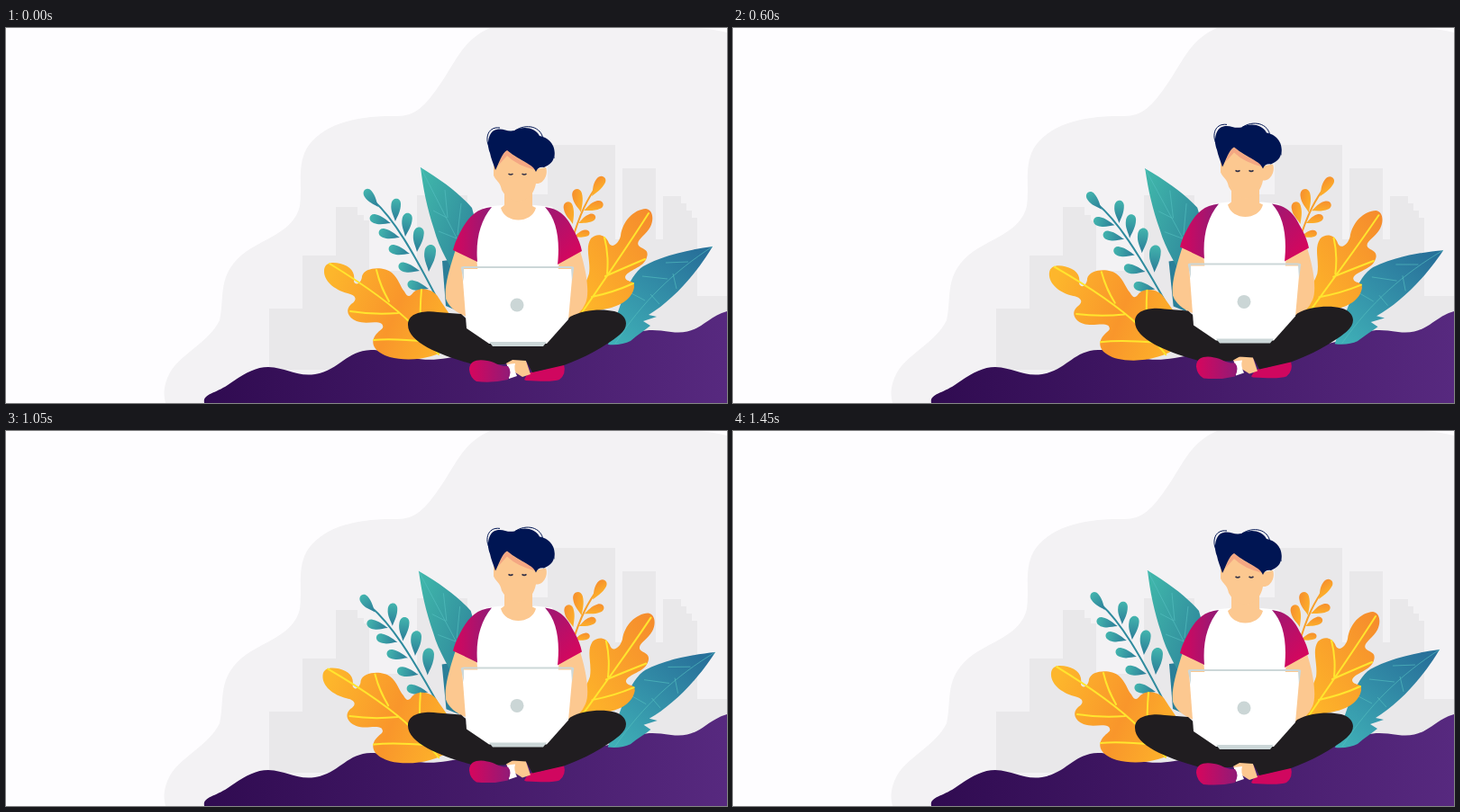
These frames come from a looping animation (800x417 px, 1.5 s). An HTML page:

```html
<!DOCTYPE html>
<html lang="en">
<head>
<meta charset="utf-8">
<title>Working outdoors</title>
<style>
  html, body { margin: 0; width: 100%; height: 100%; overflow: hidden; background: #fefdff; }
  svg { display: block; width: 100vw; height: 100vh; }
  .vein { fill: none; stroke: #ffe52e; stroke-width: 2; stroke-linecap: round; }
  .rib { fill: none; stroke: #55bfc0; stroke-width: .8; opacity: .8; }
  .stem { fill: none; stroke-width: 2; }
</style>
</head>
<body>
<svg viewBox="0 0 800 417" preserveAspectRatio="none">
  <defs>
    <linearGradient id="hill"><stop stop-color="#300b51"/><stop offset="1" stop-color="#57297f"/></linearGradient>
    <linearGradient id="gold" x1="0" y1=".3" x2="1" y2=".6"><stop stop-color="#fdb62c"/><stop offset=".55" stop-color="#f9962b"/><stop offset="1" stop-color="#fdb32a"/></linearGradient>
    <linearGradient id="amber" x1="1" y1="0" x2="0" y2="1"><stop stop-color="#f58a2d"/><stop offset="1" stop-color="#ffba29"/></linearGradient>
    <linearGradient id="teal" x1="0" y1="0" x2="1" y2=".6"><stop stop-color="#41b9ab"/><stop offset="1" stop-color="#2c7e99"/></linearGradient>
    <linearGradient id="sea" x1="0" y1="1" x2=".8" y2="0"><stop stop-color="#40b2b8"/><stop offset="1" stop-color="#28719a"/></linearGradient>
    <linearGradient id="sprig"><stop stop-color="#2b7b97"/><stop offset="1" stop-color="#43b5ae"/></linearGradient>
    <linearGradient id="sleeve"><stop stop-color="#d6065d"/><stop offset="1" stop-color="#901b77"/></linearGradient>
    <linearGradient id="sleeveR" x1="0" y1="0" x2=".6" y2="1"><stop stop-color="#9c1873"/><stop offset="1" stop-color="#d6065d"/></linearGradient>
    <path id="leaf" d="M0 0C6-2 10-6 18-5.500C26-5 26 4 19 4.500C11 5 6 2 0 0Z"/>
  </defs>

  <path fill="#f3f2f4" d="M800 5Q785 1 765 0H537C507 13 500 36 482 62C465 87 454 98 434 98C390 97 350 106 333 135C323 155 329 175 326 198C319 228 284 234 262 252C234 276 243 299 237 325C225 350 191 364 181 385C174 399 175 409 177 417H800Z"/>
  <path fill="#e9e8ea" d="M292 380V312H329V253H366V199H390V208H397V214H403V270H456V186H512V230H565V185H601V130H676V235H684V156H721V235H729V187H749V195H755V203H761V211H767V298H800V380Z"/>
  <path fill="url(#hill)" d="M220 417C218 407 231 407 246 397C262 386 275 377 291 377C312 378 322 388 343 385C371 380 377 359 405 358C430 358 450 374 490 367C560 354 630 364 685 344C708 334 717 335 738 338C770 342 775 322 800 315V417Z"/>

  <g id="spike">
    <path fill="#2b7f98" d="M484 259L500 257L502 315L488 309Z"/>
    <path fill="url(#teal)" d="M460 155C485 170 505 186 517 200L540 285H505C491 263 480 243 475 224C467 199 463 180 460 155Z"/>
    <path class="rib" d="M460 155Q488 210 516 265M474 203L489 211M487 180L490 211M480 226L500 234M505 195L501 230"/>
  </g>
  <g id="fern"><path class="stem" stroke="#2f8b9e" d="M408 192C430 212 450 245 484 312"/></g>
  <g id="oak">
    <path fill="url(#gold)" d="M353 269C354 260 363 260 371 262C382 265 388 271 386 282C389 288 395 282 395 276C398 265 420 265 428 272C436 279 437 287 442 293C446 301 449 298 452 294C459 287 475 290 480 300C488 313 510 338 495 354C475 369 445 371 426 366C410 361 404 352 409 343C415 334 421 335 417 329C410 325 400 330 389 326C379 322 376 313 383 307C391 302 388 297 379 295C364 291 352 281 353 269Z"/>
    <path class="vein" d="M359 262C390 281 425 304 451 330Q462 340 480 363M411 269C415 286 420 295 425 304M382 315Q407 319 435 317M461 291Q459 312 460 338M408 347Q430 345 468 349"/>
  </g>
  <g id="twig"><path class="stem" stroke="#f8a02b" d="M658 172C645 190 637 205 627 240"/></g>
  <g id="blade">
    <path fill="url(#sea)" d="M784 243C760 246 728 253 707 265C690 276 680 312 668 352C678 353 687 351 693 348C701 341 709 336 715 331L707 326L722 321L713 319C738 304 765 275 784 243Z"/>
    <path class="rib" d="M784 243C742 270 705 305 676 351M757 260L732 261M734 279L706 276M709 303L692 294M740 273L744 290M715 296L725 307"/>
  </g>
  <g id="maple">
    <path fill="url(#amber)" d="M710 201C718 202 719 213 715 221C710 231 698 236 702 242C706 246 714 246 711 255C708 267 689 269 687 277C688 284 698 279 697 288C695 301 682 309 667 312C651 316 640 317 632 322C633 295 643 287 647 273C649 258 642 245 649 234C655 228 664 229 668 237C671 247 680 240 682 231C684 215 696 202 710 201Z"/>
    <path class="vein" d="M713 206C696 233 675 264 640 315M664 233Q669 252 667 273M709 257Q690 265 665 276M696 284Q674 294 650 299"/>
  </g>

  <g id="person">
    <path fill="#fcc890" d="M499 246C493 265 486 286 488 301Q493 315 514 322L530 255ZM637 248C644 270 648 295 643 306Q638 319 620 328L608 258Z"/>
    <path fill="#fff" d="M530 199L551 197Q568 205 586 197L606 199L617 230L612 275H524L520 235Z"/>
    <path fill="url(#sleeve)" d="M539 199C519 201 511 214 504 227Q498 238 496 247L523 260C521 235 526 215 539 199Z"/>
    <path fill="url(#sleeveR)" d="M598 199C619 202 624 214 631 227Q637 238 639 248L612 263C615 235 611 213 598 199Z"/>
    <path fill="#fcc890" d="M553 178H584V198L588 200C583 218 554 218 549 200L553 197Z"/>
    <path fill="#fcc890" d="M541 147V164C544 171 548 170 550 180C554 188 562 193 569 193C581 191 586 183 588 173C597 174 602 162 599 155L588 157L575 134H552Z"/>
    <path fill="#f4a783" d="M546 153Q551 139 556 136Q570 149 587 153L588 158Q567 153 556 142Z"/>
    <path fill="#001553" d="M543 158C541 151 538 145 537 139C533 129 535 115 544 113C552 111 556 116 564 114C573 109 587 110 592 120C604 122 611 133 608 143C607 151 600 153 597 155Q590 154 588 160C585 151 572 149 556 136C550 139 547 151 543 158Z"/>
    <path fill="none" stroke="#001553" d="M539 137C530 126 533 109 548 111M565 114C577 106 594 109 596 124M602 127Q609 133 608 145"/>
    <path fill="none" stroke="#303047" stroke-width="1.500" d="M557.500 162Q560 164 562.500 162M572.500 162Q575 164 577.500 162"/>

    <path fill="#d0075f" d="M575 391Q579 381 592 381L619 374Q622 385 614 391Q607 394 577 392Z"/>
    <path fill="#fcc890" d="M554 370L576 367L582 385L573 388L557 378Z"/>
    <path fill="#201d20" d="M446 330C446 316 465 314 479 316L505 318L540 350H598L626 321C641 313 661 312 675 315C690 319 692 332 681 341C664 355 641 367 619 375L584 383L577 370L562 369L553 374L518 374C490 366 446 352 446 330Z"/>
    <path fill="#fff" d="M556 374L565 373Q563 379 567 387L558 390Z"/>
    <path fill="url(#sleeve)" d="M514 380C514 369 525 368 534 370C542 371 548 377 557 376Q562 382 557 391Q540 395 522 393Q515 389 514 380Z"/>
    <path fill="#fff" d="M506 268H629L624 324L600 351H536L511 334Z"/>
    <path fill="#ccd7d8" d="M505 268Q504 265 508 265H627Q631 265 630 268L628 282L627 267H508V282ZM536 349H600L596 354H540Z"/>
    <circle cx="567" cy="308" r="7.500" fill="#cbd6d6"/>
  </g>
</svg>
<script>
const byId = id => document.getElementById(id);

// Each leaf: base x, base y, direction in degrees, size.
function addLeaves(id, fill, leaves) {
  byId(id).insertAdjacentHTML('beforeend', leaves.map(([x, y, angle, size]) =>
    `<use href="#leaf" fill="${fill}" transform="translate(${x} ${y}) rotate(${angle}) scale(${size})"/>`).join(''));
}
addLeaves('fern', 'url(#sprig)', [
  [413, 199, 234, 1], [427, 217, 197, 1], [437, 233, 197, 1], [448, 251, 197, 1],
  [459, 270, 195, 1], [469, 290, 195, 1], [476, 302, 170, .95],
  [432, 215, -86, 1.050], [443, 232, -82, 1.100], [456, 249, -83, 1.150], [469, 271, -84, 1.250]
]);
addLeaves('twig', 'url(#amber)', [
  [650, 187, -58, 1.050], [641, 203, -20, .95], [635, 217, -22, .85], [630, 232, -15, .75],
  [638, 205, -101, 1.100], [629, 218, -104, 1.050]
]);

// Each plant: id, swing in degrees, pivot x, pivot y, lag in ms.
const plants = [
  ['spike', -1.4, 510, 280, 0], ['fern', -2.6, 485, 310, 50], ['oak', -1.7, 490, 350, 0],
  ['twig', 1.4, 630, 245, 0], ['blade', 2.6, 685, 345, 0], ['maple', 2, 645, 315, 0]
];
const LOOP = 1500, STEP = 50;
const wave = ms => (1 - Math.cos(2 * Math.PI * ms / LOOP)) / 2;
const start = performance.now();

function draw() {
  const ms = Math.floor((performance.now() - start) % LOOP / STEP) * STEP;
  for (const [id, swing, x, y, lag] of plants)
    byId(id).setAttribute('transform', `rotate(${swing * wave(ms - lag)} ${x} ${y})`);
  byId('person').setAttribute('transform', `translate(0 ${-4 * wave(ms)})`);
  requestAnimationFrame(draw);
}
draw();
</script>
</body>
</html>
```
